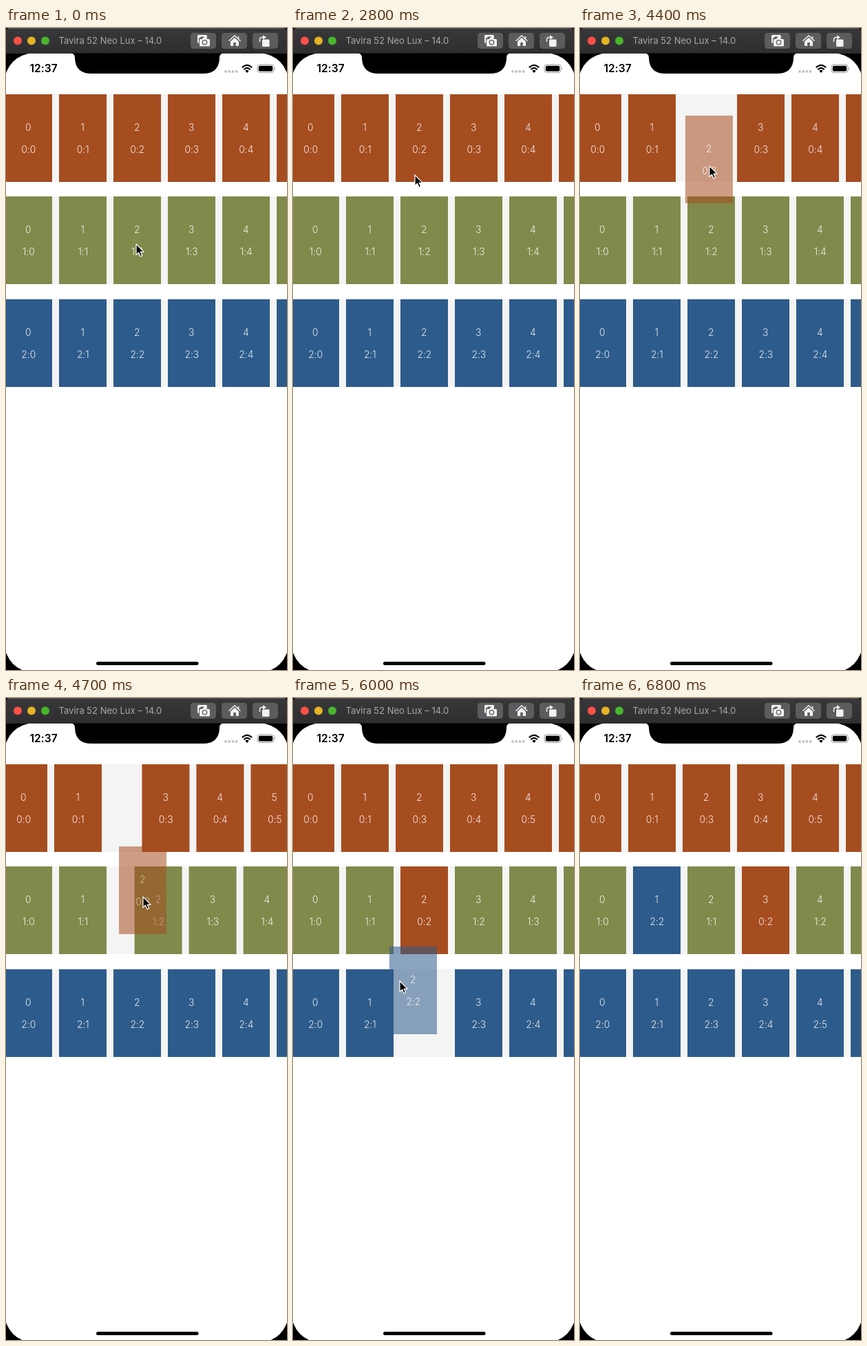
An HTML page that plays this animation: 408x930 px, repeating every 6900 ms.

```html
<!DOCTYPE html>
<html lang="en">
<head>
<meta charset="utf-8">
<title>Drag between rows</title>
<style>
  html, body { margin: 0; width: 100%; height: 100%; overflow: hidden; background: #000; }
  svg { display: block; width: 408px; height: 930px; }
  text { font-family: Inter, "Liberation Sans", sans-serif; font-feature-settings: "calt" 0; }
  #cards text { font-size: 13.8px; font-weight: 300; fill: #fff; fill-opacity: .88; text-anchor: middle; }
</style>
</head>
<body>
<svg viewBox="0 0 408 930">
  <defs>
    <linearGradient id="bar" x2="0" y2="1">
      <stop offset="0" stop-color="#38383b"/><stop offset="1" stop-color="#2e2e31"/>
    </linearGradient>
    <clipPath id="screen"><rect x="-2" y="36.5" width="412" height="897" rx="42"/></clipPath>
  </defs>
  <rect width="408" height="930"/>
  <rect x="-2" y="36.5" width="412" height="897" rx="42" fill="#fff"/>
  <g clip-path="url(#screen)"><g id="strips" fill="#f4f4f4"></g><g id="cards"></g></g>

  <!-- window bar -->
  <path d="M0 37V5Q0 0 5 0H403Q408 0 408 5V37Z" fill="url(#bar)"/>
  <path d="M4 .5H404" stroke="#5c5c5f"/>
  <circle cx="17" cy="18.5" r="6" fill="#fc5047"/>
  <circle cx="37" cy="18.5" r="6" fill="#e5b323"/>
  <circle cx="57" cy="18.5" r="6" fill="#48b52b"/>
  <text x="76.5" y="23" font-size="13" fill="#a8a8aa">Tavira 52 Neo Lux – 14.0</text>
  <g fill="#5c5c5f">
    <rect x="268" y="7" width="37" height="23" rx="4.5"/>
    <rect x="313" y="7" width="37" height="23" rx="4.5"/>
    <rect x="358" y="7" width="37" height="23" rx="4.5"/>
  </g>
  <g fill="#f2f2f2">
    <path d="M279 10H290Q292 10 292 12V14H288L286.500 12.500H283L281.500 14.500H280V22H279Q278 22 278 20V12Q278 10 279 10Z"/>
    <path d="M282.500 16H285L286.200 14H291L292.200 16H294.500Q296 16 296 17.500V25Q296 26.500 294.500 26.500H282.500Q281 26.500 281 25V17.500Q281 16 282.500 16Z"/>
    <circle cx="288.500" cy="20.800" r="3.200" fill="none" stroke="#5c5c5f" stroke-width="1.300"/>
    <path d="M326 19.500L332 14L338 19.500V26H333.800V21H330.200V26H326Z"/>
    <path d="M323.500 18.800L332 11L340.500 18.800M337.500 12V16" fill="none" stroke="#f2f2f2" stroke-width="1.500"/>
    <rect x="372" y="16.500" width="10.500" height="10.500" rx="1.500"/>
    <path d="M368.500 20V17Q368.500 13.500 372 13.500H374" fill="none" stroke="#f2f2f2" stroke-width="1.500"/>
    <path d="M373 10.200L378 13.500L373 16.800Z"/>
  </g>

  <!-- notch, status and home line -->
  <path d="M94 36.500Q100 37 100 43V44Q101 66 124 66H286Q309 66 310 44V43Q310 37 316 36.500Z"/>
  <text x="34.500" y="64.300" font-size="15.600" font-weight="600">12:37</text>
  <g fill="#c2c2c4">
    <circle cx="319" cy="63" r="1.900"/><circle cx="324.200" cy="63" r="1.900"/>
    <circle cx="329.400" cy="63" r="1.900"/><circle cx="334.600" cy="63" r="1.900"/>
  </g>
  <g fill="none" stroke="#000" stroke-width="2.200">
    <path d="M342.800 57.300Q350 50.300 357.200 57.300M345.300 60.200Q350 55.600 354.700 60.200"/>
  </g>
  <path d="M347.300 62Q350 59.700 352.700 62L350 65Z"/>
  <rect x="365" y="53" width="24" height="11.500" rx="3.500" fill="none" stroke="#999"/>
  <rect x="366.800" y="54.800" width="20.400" height="7.900" rx="2"/>
  <path d="M390.300 57V61Q392 59 390.300 57Z" fill="#999"/>
  <rect x="131" y="918" width="148.500" height="5" rx="2.500"/>

  <path id="cursor" d="M0 0V15.600L3.600 12.300L6 17.900L8.600 16.800L6.200 11.300H11.200Z" stroke="#fff" stroke-width="1.200" stroke-linejoin="round"/>
</svg>
<script>
const LOOP = 6900, STEP = 100;
const CARD = { w: 69, h: 127, pitch: 79, left: -2 };
const ROW_Y = [96, 244, 393];
const COLORS = ["#a64d20", "#808a4b", "#2d5b8b"];

// Cursor path: time, x, y
const PATH = [
  [0, 189, 313], [400, 189, 313], [1300, 195, 206], [2250, 195, 206],
  [2700, 177, 213], [3000, 177, 213], [3700, 184, 177], [4100, 184, 169],
  [4250, 184, 169], [4700, 199, 288], [4900, 200, 300], [5150, 200, 300],
  [5550, 171, 443], [5800, 171, 443], [6000, 155, 410], [6300, 118, 300],
  [6500, 112, 294], [6750, -16, 240], [6900, -16, 240]
];

// The two drags: card carried, target slot in the middle row, hand offset, times
const DRAGS = [
  { row: 0, slot: 2, dx: -35, dy: -73, lift: 4200, shift: 4560, drop: 5100 },
  { row: 2, slot: 1, dx: -15, dy: -50, lift: 5800, shift: 6150, drop: 6500 }
];

const svgEl = (tag, parent, attrs = {}) => {
  const el = document.createElementNS("http://www.w3.org/2000/svg", tag);
  for (const key in attrs) el.setAttribute(key, attrs[key]);
  return parent.appendChild(el);
};
const ramp = (t, start, length) => Math.min(1, Math.max(0, (t - start) / length));
const smooth = p => p * p * (3 - 2 * p);
const ease = (t, start, length) => smooth(ramp(t, start, length));
const mix = (a, b, p) => a + (b - a) * p;

const strips = document.getElementById("strips");
const layer = document.getElementById("cards");
const cursor = document.getElementById("cursor");
const cards = [];

ROW_Y.forEach((y, row) => {
  svgEl("rect", strips, { y, width: 408, height: CARD.h });
  for (let k = 0; k < 8; k++) {
    const el = svgEl("g", layer);
    svgEl("rect", el, { width: CARD.w, height: CARD.h, fill: COLORS[row] });
    const index = svgEl("text", el, { x: 34.3, y: 53 });
    svgEl("text", el, { x: 34.8, y: 85.3 }).textContent = row + ":" + k;
    const drag = k === 2 ? DRAGS.find(d => d.row === row) : undefined;
    cards.push({ row, k, el, index, drag });
  }
});
// Carried cards stay above the rest
cards.filter(c => c.drag).forEach(c => layer.appendChild(c.el));

function cursorAt(t) {
  const i = PATH.findIndex(p => p[0] > t);
  const [t0, x0, y0] = PATH[i - 1], [t1, x1, y1] = PATH[i];
  const p = ease(t, t0, t1 - t0);
  return [mix(x0, x1, p), mix(y0, y1, p)];
}

function render(t) {
  const [cx, cy] = cursorAt(t);
  const scroll = -7 * ease(t, 2300, 400);
  const open = DRAGS.map(d => ease(t, d.shift, 330));
  const done = DRAGS.map(d => t >= d.drop ? 1 : 0);
  const slotX = (row, slot) => CARD.left + slot * CARD.pitch + (row === 0 ? scroll : 0);

  // Slot or label of a resting card, depending on the amounts passed in
  const place = ({ row, k }, [a, b]) => {
    if (row === 0) return k - (k > 2 ? a : 0);
    if (row === 2) return k - (k > 2 ? b : 0);
    return k + (k >= 2 ? a : 0) + (k >= 1 ? b : 0);
  };

  for (const card of cards) {
    const { row, k, el, index, drag } = card;
    let x = slotX(row, place(card, open)), y = ROW_Y[row];
    let label = place(card, done), opacity = 1;

    if (drag && t >= drag.lift) {
      const first = drag === DRAGS[0];
      const [hx, hy] = cursorAt(Math.min(t, drag.drop));
      const land = ease(t, drag.drop, 250);
      x = mix(hx + drag.dx, slotX(1, drag.slot + (first ? open[1] : 0)), land);
      y = mix(hy + drag.dy, ROW_Y[1], land);
      opacity = mix(0.55, 1, land);
      label = !done[first ? 0 : 1] ? k : drag.slot + (first ? done[1] : 0);
    }
    el.setAttribute("transform", `translate(${x.toFixed(2)} ${y.toFixed(2)})`);
    el.setAttribute("opacity", opacity);
    index.textContent = label;
  }
  cursor.setAttribute("transform", `translate(${cx.toFixed(2)} ${cy.toFixed(2)})`);
}

const start = performance.now();
function tick() {
  const t = (performance.now() - start) % LOOP;
  render(Math.floor(t / STEP) * STEP);
  requestAnimationFrame(tick);
}
tick();
</script>
</body>
</html>
```
